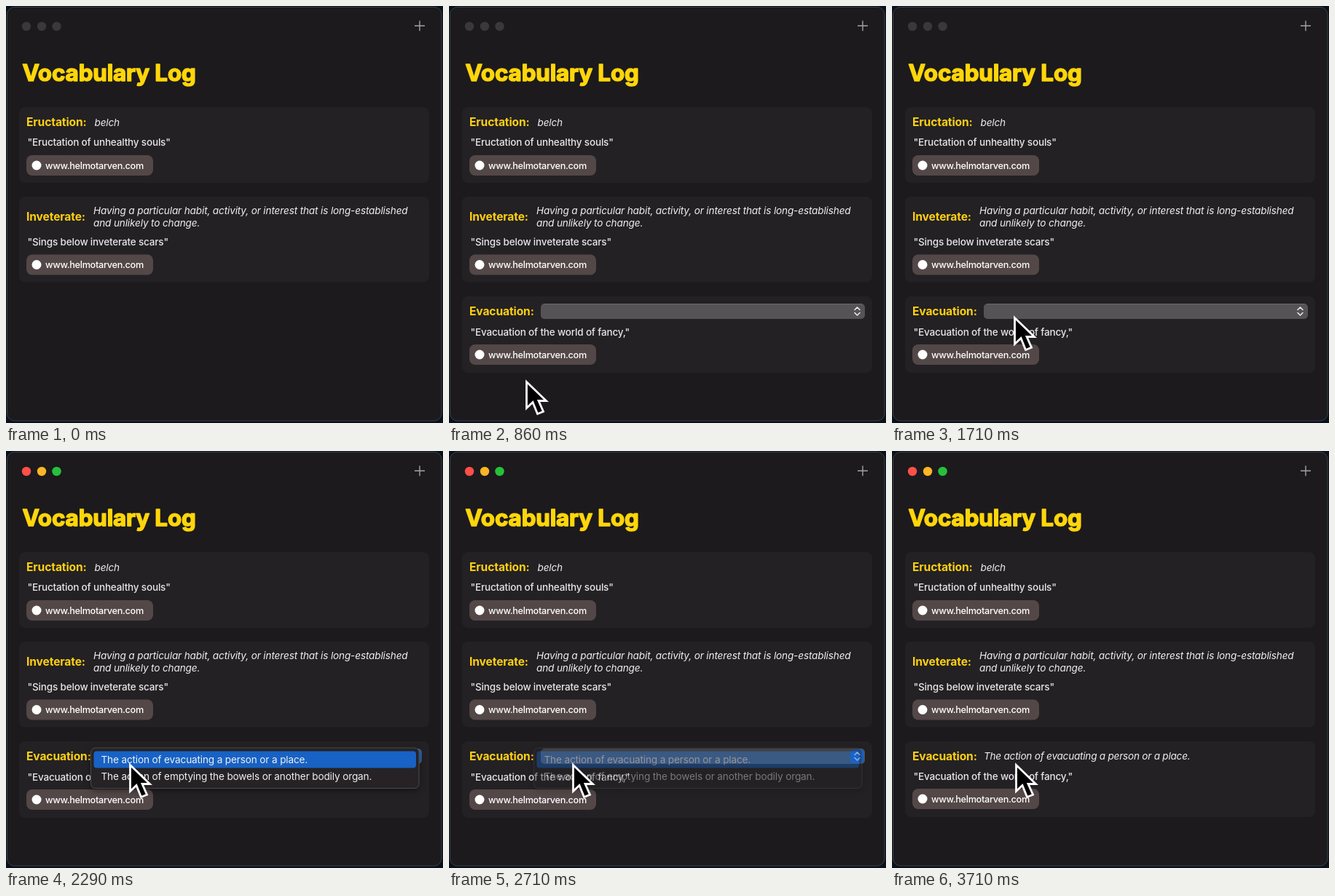
An HTML page for the animation above (4.01 s loop, 600 by 573 pixels).

```html
<!DOCTYPE html>
<html lang="en">
<head>
<meta charset="utf-8">
<title>Vocabulary Log</title>
<style>
  html, body { margin: 0; width: 100%; height: 100%; overflow: hidden; background: #0b111b; }
  svg { display: block; width: 100vw; height: 100vh; }
  text { font: 450 13.5px Inter, "Liberation Sans", sans-serif; letter-spacing: -.17px; fill: #e8e6e8; white-space: pre; }
  .title { font-size: 31.3px; font-weight: 700; letter-spacing: -.1px; fill: #ffd60a;
           stroke: #ffd60a; stroke-width: 1.5; stroke-linejoin: round; }
  .word { font-size: 15.6px; font-weight: 700; letter-spacing: -.12px; fill: #ffd012; }
  .def { font-size: 13.6px; font-weight: 400; font-style: italic; letter-spacing: -.15px; fill: #efeef0; }
  .url { font-size: 12.7px; font-weight: 500; letter-spacing: -.3px; fill: #fff; }
  .item { font-size: 13.6px; font-weight: 400; letter-spacing: -.15px; fill: #f0eff1; }
  .fetch text { font-size: 13.6px; fill: #1b6edb; }
  .card { fill: #232124; }

  .t { animation: 4010ms step-end infinite; }
  .entry { animation-name: entry; }
  .fetch { animation-name: fetch; }
  .popup { animation-name: popup; }
  .shift { animation-name: shift; }
  .active { animation-name: active; }
  .menu { animation-name: menu; }
  .chosen { animation-name: chosen; letter-spacing: -.24px; }
  .cursor { animation-name: cursor; }

  @keyframes entry {
    0% { opacity: 0; } 3.49% { opacity: .35; } 7.23% { opacity: .85; } 10.72%, 100% { opacity: 1; }
  }
  @keyframes fetch {
    0% { opacity: 1; } 14.21% { opacity: .95; } 17.7% { opacity: .4; } 21.44%, 100% { opacity: 0; }
  }
  @keyframes popup {
    0% { opacity: 0; } 17.7% { opacity: .6; } 21.44% { opacity: 1; }
    74.81% { opacity: .5; } 78.3%, 100% { opacity: 0; }
  }
  @keyframes shift {
    0% { transform: none; } 17.7% { transform: translateY(1px); } 78.3%, 100% { transform: none; }
  }
  @keyframes active { 0% { opacity: 0; } 46.38%, 100% { opacity: 1; } }
  @keyframes menu {
    0% { opacity: 0; } 46.38% { opacity: 1; } 67.58% { opacity: .42; } 71.32%, 100% { opacity: 0; }
  }
  @keyframes chosen { 0% { opacity: 0; } 74.81% { opacity: .5; } 78.3%, 100% { opacity: 1; } }
  @keyframes cursor {
    0% { opacity: 0; transform: translate(106px, 515px); }
    21.44% { opacity: 1; transform: translate(106px, 515px); }
    24.93% { opacity: 1; transform: translate(119px, 491px); }
    28.42% { opacity: 1; transform: translate(140px, 455px); }
    32.16% { opacity: 1; transform: translate(156px, 430px); }
    35.66% { opacity: 1; transform: translate(164px, 421px); }
    39.15% { opacity: 1; transform: translate(166px, 424px); }
    42.64% { opacity: 1; transform: translate(168px, 427px); }
    46.38%, 100% { opacity: 1; transform: translate(170px, 430px); }
  }
</style>
</head>
<body>
<svg viewBox="0 0 600 573" preserveAspectRatio="none">
  <defs>
    <g id="link">
      <rect width="174" height="28" rx="8" fill="#534847"/>
      <circle cx="14" cy="14" r="6.5" fill="#fff"/>
      <text class="url" x="26" y="18.6">www.helmotarven.com</text>
    </g>
    <filter id="soft" x="-10%" y="-40%" width="120%" height="200%">
      <feDropShadow dx="0" dy="3" stdDeviation="4" flood-color="#000" flood-opacity=".4"/>
    </filter>
  </defs>

  <rect x="1.5" y="1.5" width="596.5" height="568.5" rx="10" fill="#1c1a1c" stroke="#38434b"/>

  <g fill="#3a383a">
    <circle cx="28" cy="28" r="6.2"/><circle cx="49" cy="28" r="6.2"/><circle cx="69.5" cy="28" r="6.2"/>
  </g>
  <g class="t active">
    <circle cx="28" cy="28" r="6.2" fill="#fe4f48"/>
    <circle cx="49" cy="28" r="6.2" fill="#fdb525"/>
    <circle cx="69.5" cy="28" r="6.2" fill="#25c13a"/>
  </g>
  <path d="M561 27.2h14M568 20.2v14" stroke="#a3a2a3" stroke-width="1.4"/>

  <text class="title" x="22.5" y="103.3">Vocabulary Log</text>

  <rect class="card" x="18" y="139" width="563" height="104" rx="8"/>
  <text class="word" x="28" y="165">Eructation:</text>
  <text class="def" x="121.5" y="164.5">belch</text>
  <text x="29.5" y="192">"Eructation of unhealthy souls"</text>
  <use href="#link" x="28" y="205"/>

  <rect class="card" x="18" y="262" width="563" height="117.5" rx="8"/>
  <text class="word" x="28" y="295">Inveterate:</text>
  <text class="def" x="120" y="286">Having a particular habit, activity, or interest that is long-established</text>
  <text class="def" x="120" y="303">and unlikely to change.</text>
  <text x="29.5" y="328.5">"Sings below inveterate scars"</text>
  <use href="#link" x="28" y="341.5"/>

  <g class="t entry">
    <rect class="card t shift" x="18" y="399" width="563" height="104" rx="8"/>
    <rect class="card" x="18" y="399" width="563" height="50" rx="8"/>
    <text class="word" x="28" y="425">Evacuation:</text>
    <g class="t shift">
      <text x="29.5" y="452">"Evacuation of the world of fancy,"</text>
      <use href="#link" x="28" y="464"/>
    </g>

    <g class="t fetch">
      <g fill="none" stroke="#1b6edb" stroke-width="2.2">
        <path d="M127.8 418.2Q134.5 411.8 141.2 418.2"/>
        <path d="M130.5 421.2Q134.5 417.4 138.5 421.2"/>
      </g>
      <path d="M132.3 422.8Q134.5 421 136.7 422.8L134.5 425.2Z" fill="#1b6edb"/>
      <text x="146.5" y="424">Fetching Definitions...</text>
    </g>

    <g class="t popup">
      <rect x="126" y="409" width="445" height="21" rx="5" fill="#555355"/>
      <path d="M130 409.5H567" stroke="#6b696b"/>
      <rect class="t active" x="551.5" y="410" width="18.5" height="19" rx="4.5" fill="#1766d2"/>
      <path d="M557 417.5l3.5-3.5 3.5 3.5M557 421.5l3.5 3.5 3.5-3.5" fill="none" stroke="#eee"
            stroke-width="1.5" stroke-linecap="round" stroke-linejoin="round"/>
    </g>

    <text class="def t chosen" x="126" y="424">The action of evacuating a person or a place.</text>
  </g>

  <g class="t menu">
    <rect x="116.5" y="408" width="450.5" height="55.5" rx="6" fill="#252326" stroke="#4b4a4c" filter="url(#soft)"/>
    <rect x="120.5" y="412.5" width="442.5" height="23" rx="4" fill="#1762c4"/>
    <text class="item" x="130.5" y="429">The action of evacuating a person or a place.</text>
    <text class="item" x="130.5" y="452">The action of emptying the bowels or another bodily organ.</text>
  </g>

  <g class="t cursor">
    <path d="M.5 1.5V37.500L9 29.5 15.500 45.500 23.500 42.300 17 27.500H27.500Z" fill="#000" stroke="#fff" stroke-width="2.8"/>
  </g>
</svg>
</body>
</html>
```
